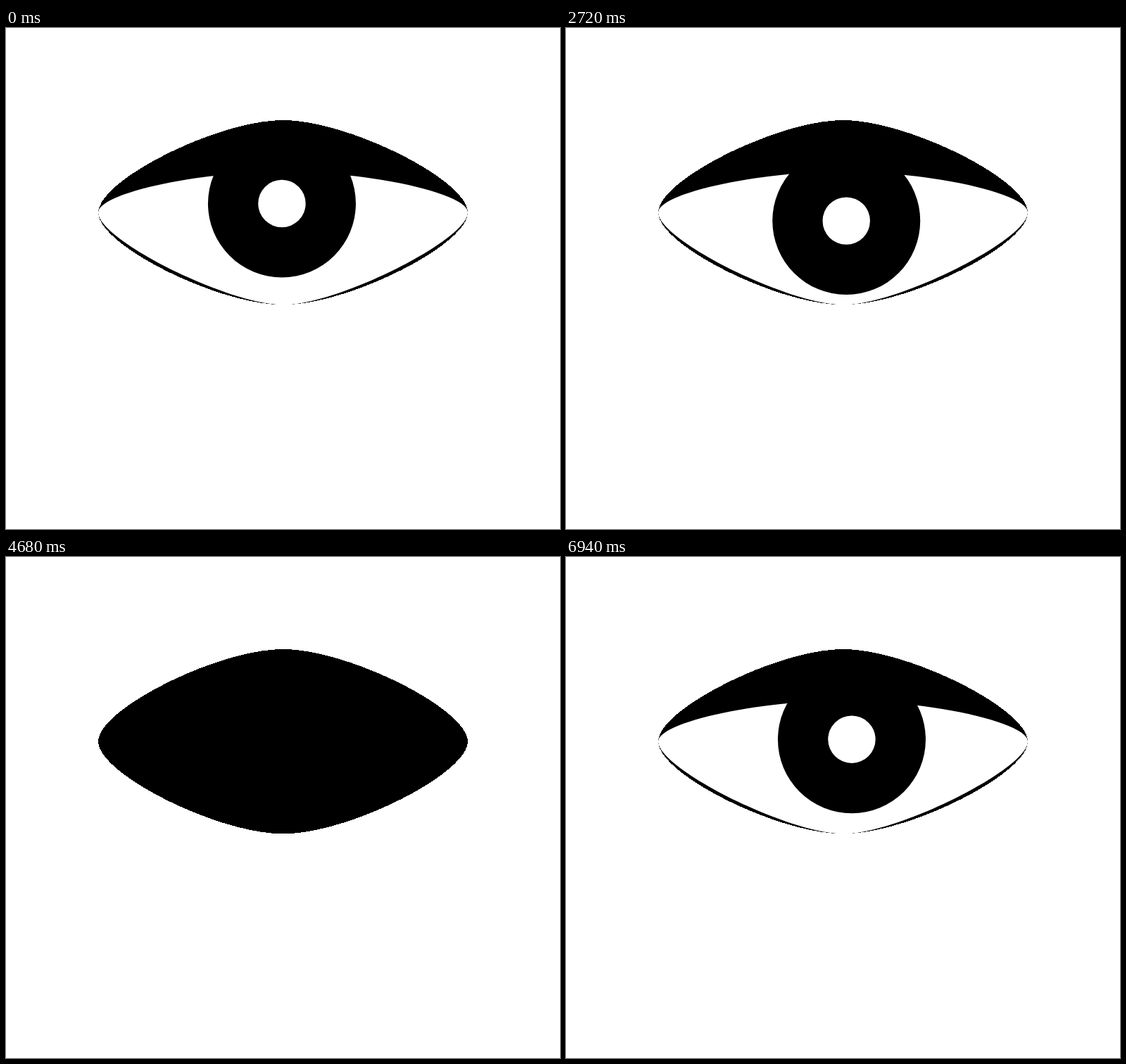
Write an HTML page that moves like this. It is 787 px wide and 712 px high and loops after 7010 ms.

```html
<!DOCTYPE html>
<html lang="en">
<head>
<meta charset="utf-8">
<title>Eye</title>
<style>
  html, body { margin: 0; width: 100%; height: 100%; overflow: hidden; background: #fff; }
  svg { display: block; }
</style>
</head>
<body>
<svg width="787" height="712" viewBox="0 0 787 712">
  <clipPath id="lids"><path id="lidShape"/></clipPath>
  <path id="socket" shape-rendering="crispEdges"/>
  <path id="white" fill="#fff"/>
  <circle id="iris" r="105"/>
  <g clip-path="url(#lids)"><circle id="pupil" r="33.7" fill="#fff"/></g>
</svg>
<script>
const LOOP = 7010, CX = 393.5, CY = 262.2, HALF = 262.5, ORBIT = 12.8;
const BLINKS = [2160, 4680], BLINK_HALF = 230;

// [time, gaze direction in degrees clockwise from up]
const GAZE = [
  [0, -7], [1600, -7], [1670, -2], [1900, 18], [2800, 172], [3140, 184], [3700, 178],
  [3840, 175], [4120, 174], [5120, 174], [5820, 158], [5890, 155],
  [6170, 146], [6730, 93], [6940, 76.5], [LOOP, 76.5]
];

const find = id => document.getElementById(id);
const [socket, white, lidShape, iris, pupil] =
  ['socket', 'white', 'lidShape', 'iris', 'pupil'].map(find);

// The picture advances in 70 ms steps after the opening hold.
function stepTime(t) {
  if (t < 1670) return 0;
  const base = t < 5050 ? 1670 : 5050;
  return base + Math.floor((t - base) / 70) * 70;
}

function gazeAt(t) {
  const i = GAZE.findIndex(([time]) => time > t);
  const [t0, a0] = GAZE[i - 1], [t1, a1] = GAZE[i];
  return (a0 + (a1 - a0) * (t - t0) / (t1 - t0)) * Math.PI / 180;
}

function opennessAt(t) {
  const distance = Math.min(...BLINKS.map(b => Math.abs(t - b)));
  const p = Math.min(1, distance / BLINK_HALF);
  return p * p * (3 - 2 * p);
}

// Almond outline; the k values set how full each half is.
function almond(top, kTop, bottom, kBottom) {
  const left = CX - HALF, right = CX + HALF;
  const arch = (from, to, height, k) =>
    `C${from} ${CY + height * k} ${CX + (from - CX) * k} ${CY + height} ${CX} ${CY + height}` +
    `S${to} ${CY + height * k} ${to} ${CY}`;
  return `M${left} ${CY}${arch(left, right, -top, kTop)}${arch(right, left, bottom, kBottom)}Z`;
}

function draw(t) {
  const open = opennessAt(t);
  const opening = open ? almond(58 * open, 0.47, 131.3 * open, 0.295) : '';
  white.setAttribute('d', opening);
  lidShape.setAttribute('d', opening);

  const angle = gazeAt(t);
  for (const disc of [iris, pupil]) {
    disc.setAttribute('cx', CX + ORBIT * Math.sin(angle));
    disc.setAttribute('cy', CY - ORBIT * Math.cos(angle));
  }
}

socket.setAttribute('d', almond(131.2, 0.352, 131.2, 0.352));
const start = performance.now();
function tick() {
  draw(stepTime((performance.now() - start) % LOOP));
  requestAnimationFrame(tick);
}
tick();
</script>
</body>
</html>
```
